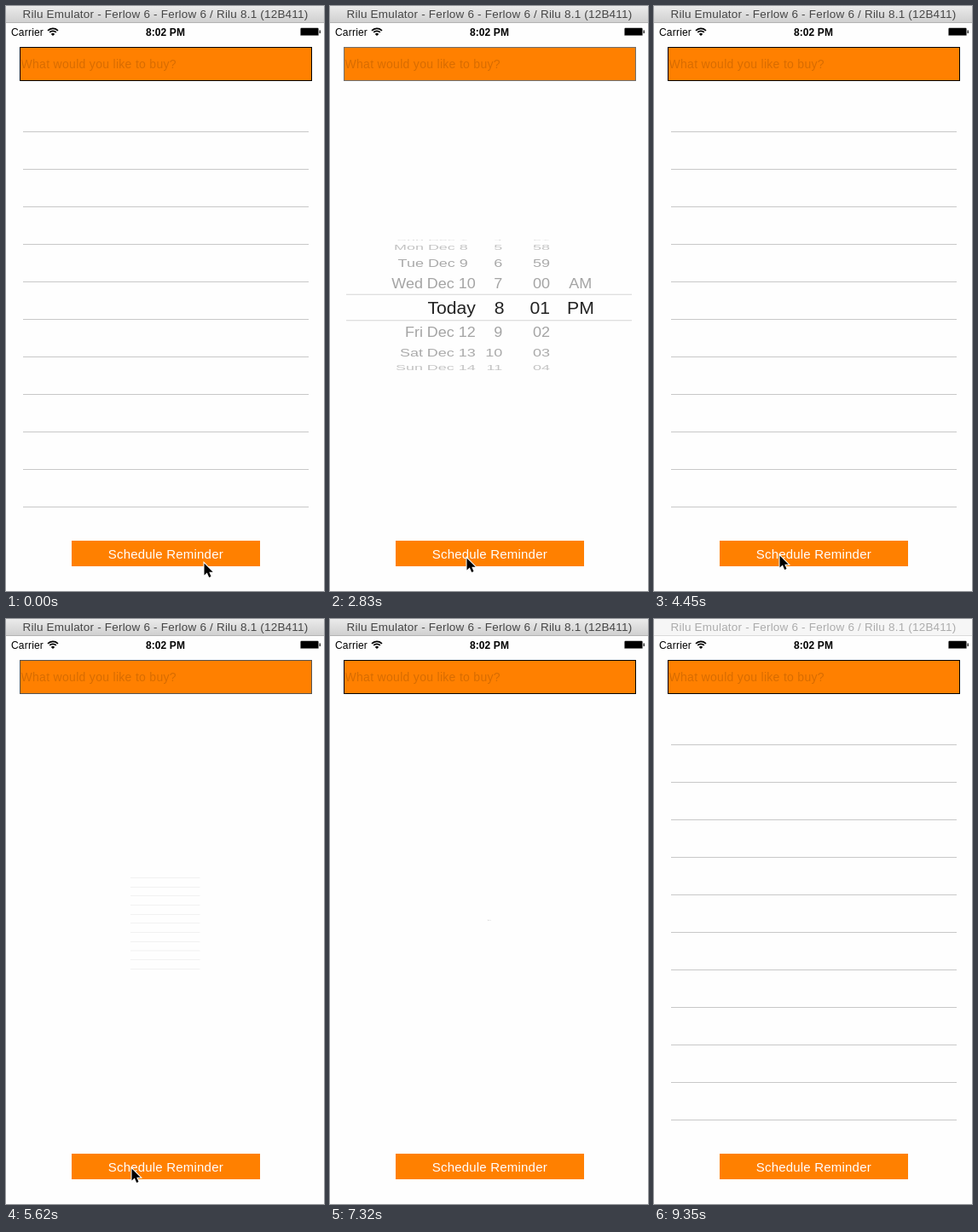
An HTML page with a canvas that plays this animation: 373 by 686 pixels, repeating every 9.4 s.

```html
<!DOCTYPE html>
<html lang="en">
<head>
<meta charset="utf-8">
<title>Schedule Reminder</title>
<style>
html, body { margin: 0; height: 100%; overflow: hidden; background: #fefefe; }
canvas { display: block; }
</style>
</head>
<body>
<canvas id="stage" width="373" height="686"></canvas>
<script>
const LOOP = 9400, W = 373, H = 686, CX = 186.5, CY = 353.5, ORANGE = '#ff8000';
const ctx = document.getElementById('stage').getContext('2d');

const clamp = v => Math.max(0, Math.min(1, v));
const mix = (a, b, k) => a + (b - a) * k;
const ramp = (t, a, b) => clamp((t - a) / (b - a));
const ease = k => k < .5 ? 2 * k * k : 1 - 2 * (1 - k) * (1 - k);

// start, swap and end of each transition; they alternate open, close
const SWAPS = [[2210, 2560, 2910], [3770, 4110, 4450], [5380, 5750, 6130], [6970, 7355, 7800]];
const PRESSES = [[1870, 2210], [3480, 3770]];
// time, x, y of the pointer
const POINTER = [[0, 231, 652], [769, 231, 652], [770, 230, 653], [1519, 230, 653], [1520, 230, 652],
  [1630, 230, 651], [2400, 230, 651], [2830, 159, 646], [3060, 146, 643], [7030, 146, 643], [7250, 190, 660]];

function rect(x, y, w, h, color) {
  ctx.fillStyle = color;
  ctx.fillRect(x, y, w, h);
}

function text(str, x, y, size, color, align = 'left', spacing = 0, weight = 400) {
  ctx.font = `${weight} ${size}px "Liberation Sans", Arial, sans-serif`;
  ctx.letterSpacing = spacing + 'px';
  ctx.textAlign = align;
  ctx.fillStyle = color;
  ctx.fillText(str, x, y);
}

function scaled(s, draw) {
  if (s < .003) return;
  ctx.save();
  ctx.translate(CX, CY);
  ctx.scale(s, s);
  ctx.translate(-CX, -CY);
  draw();
  ctx.restore();
}

function titleBar(active) {
  const g = ctx.createLinearGradient(0, 0, 0, 19);
  g.addColorStop(0, active ? '#ebebeb' : '#f6f6f6');
  g.addColorStop(1, active ? '#d0d0d0' : '#f6f6f6');
  rect(0, 0, W, 19, g);
  rect(0, 19, W, 1, active ? '#b4b4b4' : '#dadada');
  text('Rilu Emulator - Ferlow 6 - Ferlow 6 / Rilu 8.1 (12B411)', 187, 14, 13.5,
    active ? '#464646' : '#acacac', 'center', .2);
}

function statusBar() {
  text('Carrier', 6, 35, 12, '#000', 'left', .2);
  text('8:02 PM', 187, 35, 12, '#000', 'center', .1, 700);
  ctx.strokeStyle = '#000';
  ctx.lineWidth = 1.7;
  for (const r of [8.2, 5.2]) {
    ctx.beginPath();
    ctx.arc(55, 34.5, r, -Math.PI * .76, -Math.PI * .24);
    ctx.stroke();
  }
  ctx.fillStyle = '#000';
  ctx.beginPath();
  ctx.moveTo(55, 35);
  ctx.arc(55, 35, 3, -Math.PI * .76, -Math.PI * .24);
  ctx.fill();
  ctx.fillStyle = '#777';
  ctx.beginPath();
  ctx.roundRect(345, 25.5, 22, 9.5, 1.5);
  ctx.fill();
  rect(346, 26, 20, 8, '#000');
  rect(367.5, 28.5, 1.5, 3.5, '#333');
}

function field(open) {
  const c = Math.round(mix(0, 110, open));
  rect(16, 48, 343, 40, `rgb(${c},${c},${c})`);
  rect(17, 49, 341, 38, ORANGE);
  text('What would you like to buy?', 17.5, 73, 14, '#d86c00', 'left', .3);
}

function table() {
  for (let i = 0; i < 11; i++) rect(20, 147 + 44 * i, 335, 1, '#c8c8c8');
}

function picker() {
  const days = ['Sun', 'Mon', 'Tue', 'Wed', 'Thu', 'Fri', 'Sat'];
  const greys = ['#222', '#a4a4a4', '#aaa', '#c4c4c4', '#d8d8d8'];
  ctx.save();
  ctx.beginPath();
  ctx.rect(0, 265, W, 177);
  ctx.clip();
  for (let i = -4; i <= 4; i++) {
    const angle = i * .36, size = i ? 20 : 23.5, color = greys[Math.abs(i)], day = 11 + i;
    const cell = (str, x, align = 'right') => text(str, x, size * .36, size, color, align);
    ctx.save();
    ctx.translate(0, CY + 89 * Math.sin(angle));
    ctx.scale(1, Math.cos(angle));
    cell(i ? `${days[(day + 7) % 7]} Dec ${day}` : 'Today', day < 10 ? 159 : 169);
    cell(8 + i, i ? 204 : 206.5);
    cell(String((61 + i) % 60).padStart(2, '0'), 266);
    if (i === -1) cell('AM', 291, 'left');
    if (i === 0) cell('PM', 288.5, 'left');
    ctx.restore();
  }
  ctx.restore();
  rect(0, 336, W, 1, '#d2d2d2');
  rect(0, 370, W, 1, '#d2d2d2');
}

function button(t) {
  let press = 0;
  for (const [a, b] of PRESSES) press = Math.max(press, ramp(t, a - 40, a + 50) * (t >= a) * (1 - ramp(t, b, b + 120)));
  rect(77, 627, 221, 30, ORANGE);
  text('Schedule Reminder', 187.3, 647.5, 15, `rgba(255,255,255,${1 - .7 * press})`, 'center', .2);
}

function pointer(t) {
  const n = POINTER.findIndex(k => k[0] > t);
  if (n < 0) return;
  const a = POINTER[n - 1], b = POINTER[n], k = ease(ramp(t, a[0], b[0]));
  ctx.save();
  ctx.translate(Math.round(mix(a[1], b[1], k)) + 1.5, Math.round(mix(a[2], b[2], k)) + 1.5);
  const shape = new Path2D('M0 0V14L3.3 11L5.7 16.5L8 15.5L5.8 10.2H10.2Z');
  ctx.strokeStyle = '#fff';
  ctx.lineWidth = 2;
  ctx.stroke(shape);
  ctx.fillStyle = '#000';
  ctx.fill(shape);
  ctx.restore();
}

function draw(t) {
  let list = 1, wheel = 0, open = 0;
  SWAPS.forEach(([start, swap, end], i) => {
    if (t < start) return;
    const out = 1 - ease(ramp(t, start, swap)), into = ease(ramp(t, swap, end));
    [list, wheel, open] = i % 2 ? [into, out, out] : [out, into, 1 - out];
  });
  rect(0, 0, W, H, '#fefefe');
  titleBar(t < 9350);
  statusBar();
  field(open);
  scaled(list, table);
  scaled(wheel, picker);
  button(t);
  pointer(t);
}

const began = performance.now();
function tick() {
  draw((performance.now() - began) % LOOP);
  requestAnimationFrame(tick);
}
tick();
</script>
</body>
</html>
```
